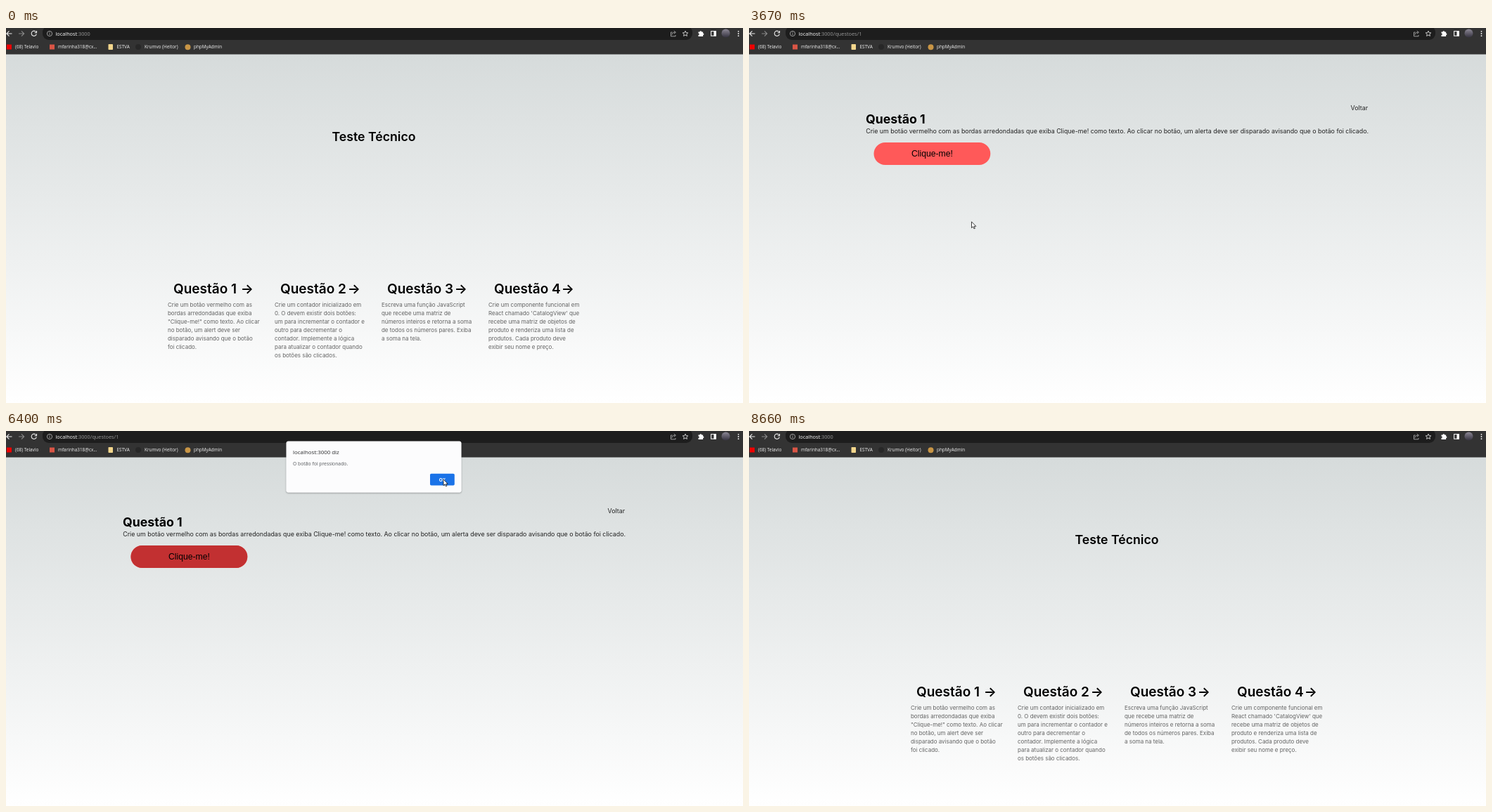
An HTML page that plays this animation: 1048 by 534 pixels, repeating every 9190 ms.

```html
<!DOCTYPE html>
<html lang="pt-BR">
<head>
<meta charset="utf-8">
<title>Teste Técnico</title>
<style>
  html, body { margin: 0; width: 100%; height: 100%; overflow: hidden; background: #fff; }
  svg { display: block; width: 100vw; height: 100vh; font-family: Inter, sans-serif; }
  .ui { font-family: "Open Sans", "Noto Sans", sans-serif; }
  .bookmarks { font-size: 6.4px; fill: #f1f1f1; }
  .url { font-size: 7.3px; fill: #fff; }
  .url .dim { fill: #9a9a9a; }
  .line { fill: none; stroke: #eee; stroke-width: 1.1; }
  .title { font-size: 17.7px; font-weight: 600; text-anchor: middle; }
  .card h2, .head { font-size: 19px; font-weight: 600; }
  .body { font-size: 7.96px; fill-opacity: .6; }
  .text { font-size: 8.85px; fill: #222; }
  .button { font: 12.2px "Liberation Sans", Arial, sans-serif; text-anchor: middle; }
</style>
</head>
<body>
<svg viewBox="0 0 1048 534" preserveAspectRatio="none">
  <defs>
    <linearGradient id="sky" x1="0" y1="0" x2="0" y2="1">
      <stop stop-color="#d6dbdb"/><stop offset="1" stop-color="#fff"/>
    </linearGradient>
    <linearGradient id="photo" x1="0" y1="0" x2="0" y2="1">
      <stop stop-color="#8b8794"/><stop offset="1" stop-color="#35323f"/>
    </linearGradient>
    <filter id="shadow" x="-10%" y="-20%" width="120%" height="150%">
      <feDropShadow dx="0" dy="1" stdDeviation="1.2" flood-opacity=".35"/>
    </filter>
  </defs>

  <rect y="37" width="1048" height="497" fill="url(#sky)"/>

  <g id="home">
    <text class="title" x="523" y="160.8">Teste Técnico</text>
    <g id="cards"></g>
  </g>

  <g id="question">
    <text class="text" x="880" y="117.2" text-anchor="end">Voltar</text>
    <text x="166" y="136.4" font-size="17.7" font-weight="700">Questão 1</text>
    <text class="text" x="166.2" y="149.8">Crie um botão vermelho com as bordas arredondadas que exiba Clique-me! como texto. Ao clicar no botão, um alerta deve ser disparado avisando que o botão foi clicado.</text>
    <g id="layers"></g>
    <text class="button" x="260.4" y="183">Clique-me!</text>
  </g>

  <g class="ui">
    <rect width="1048" height="37.5" fill="#333"/>
    <rect x="52" y="-3" width="924" height="20" rx="9" fill="#1d1d1d"/>
    <g class="line">
      <path d="M8.5 8H1M4.5 4.3L.8 8l3.7 3.7"/>
      <path d="M18 8h7.5M22 4.3L25.700 8 22 11.700" stroke="#8a8a8a"/>
      <path d="M42.600 5.500A3.600 3.600 0 1 0 43.300 8.600M43.500 4v2.700h-2.800"/>
      <circle cx="62" cy="8" r="3.600" stroke="#bbb" stroke-width=".8"/>
      <path d="M62 7.600v2.200M62 5.700v1" stroke="#bbb" stroke-width=".9"/>
      <path d="M947.500 6h-2v5.800h6.500V10M947 9.500c.3-2.500 1.700-3.300 4-3.300M949.800 4.200l2.600 2-2.600 2" stroke="#bbb" stroke-width=".8"/>
      <path d="M966 4.200l1.100 2.500 2.700.2-2 1.800.6 2.700-2.400-1.400-2.400 1.400.6-2.700-2-1.800 2.700-.2z" stroke-width=".8"/>
      <rect x="1002.600" y="4.600" width="6.800" height="6.600"/>
    </g>
    <g fill="#fff">
      <path d="M984.500 5.500h2a1.300 1.300 0 0 1 2.600 0h2v2a1.300 1.300 0 0 1 0 2.600v2h-6.600v-2a1.300 1.300 0 0 0 0-2.600z"/>
      <rect x="1006.500" y="4.500" width="3" height="7"/>
      <circle cx="1041.500" cy="4.800" r=".9"/><circle cx="1041.500" cy="8" r=".9"/><circle cx="1041.500" cy="11.200" r=".9"/>
    </g>
    <circle cx="1023.500" cy="7.500" r="6" fill="url(#photo)"/>
    <text class="url" x="70.500" y="10.600">localhost<tspan class="dim">:3000<tspan id="path">/questoes/1</tspan></tspan></text>

    <rect x="1" y="23.500" width="7" height="7" fill="#e00"/>
    <rect x="62" y="23.500" width="7" height="7" fill="#d95545"/>
    <rect x="145.500" y="23" width="6.500" height="8" rx=".8" fill="#f3d68c"/>
    <circle cx="188" cy="27" r="4" fill="#272727"/>
    <circle cx="258.500" cy="27.200" r="4" fill="#c89545"/>
    <g class="bookmarks">
      <text x="13" y="29.400">(68) Telavio</text>
      <text x="74" y="29.400">mfarinha318@cx...</text>
      <text x="157.500" y="29.400">ESTVA</text>
      <text x="197" y="29.400">Krumvo (Heitor)</text>
      <text x="267" y="29.400">phpMyAdmin</text>
    </g>
  </g>

  <g id="dialog" class="ui">
    <rect x="398.500" y="14.500" width="249" height="73" rx="3" fill="#fcfcfd" filter="url(#shadow)"/>
    <text x="408" y="33.200" font-size="7.9" fill="#2b2c2e">localhost:3000 diz</text>
    <text x="408" y="48.800" font-size="6.8" fill="#55585c">O botão foi pressionado.</text>
    <rect id="ring" x="602" y="59.800" width="36.800" height="18.800" rx="2.500" fill="#fff" stroke="#5b9bf0" stroke-width="1.300"/>
    <rect x="603" y="60.800" width="34.800" height="16.800" rx="1.800" fill="#1a73e8"/>
    <text x="620.300" y="71.500" font-size="6.3" font-weight="700" fill="#fff" text-anchor="middle">OK</text>
  </g>

  <g id="cursor" fill="#fff" stroke="#111" stroke-width=".8" stroke-linejoin="round">
    <path id="arrow" d="M0 0V8.800L2.100 7 3.500 10 4.900 9.400 3.600 6.500H6.300Z"/>
    <path id="hand" d="M-1 1Q0-.7 1 1V4.500Q2-.1+3.700 2.700 4.500 4.700Q5.600 4 5.900 5.600V8.700Q5.600 10.500 4.700 12.600H-.3Q-1.100 10.800-2.700 8.600-3.800 6.500-2.600 6.400-1.800 6.400-1 7.600Z"/>
  </g>
</svg>

<script>
const LOOP = 9190;
const OPEN_PAGE = 2650, CLOSE_PAGE = 7540;
const $ = id => document.getElementById(id);

const cards = [
  ["Crie um botão vermelho com as", "bordas arredondadas que exiba", "\"Clique-me!\" como texto. Ao clicar",
   "no botão, um alert deve ser", "disparado avisando que o botão", "foi clicado."],
  ["Crie um contador inicializado em", "0. O devem existir dois botões:", "um para incrementar o contador e",
   "outro para decrementar o", "contador. Implemente a lógica", "para atualizar o contador quando", "os botões são clicados."],
  ["Escreva uma função JavaScript", "que recebe uma matriz de", "números inteiros e retorna a soma",
   "de todos os números pares. Exiba", "a soma na tela."],
  ["Crie um componente funcional em", "React chamado 'CatalogView' que", "recebe uma matriz de objetos de",
   "produto e renderiza uma lista de", "produtos. Cada produto deve", "exibir seu nome e preço."]
];
const CARD = { x: 219, y: 350, w: 152, h: 130.8 };

$("cards").innerHTML = cards.map((lines, i) => {
  const x = CARD.x + i * CARD.w;
  const body = lines.map((s, n) => `<text class="body" x="${x + 11}" y="${397.3 + n * 11.9}">${s}</text>`).join("");
  return `<rect class="panel" x="${x + .3}" y="${CARD.y + .3}" width="${CARD.w - .6}" height="${CARD.h - .6}" rx="6.6"
    fill="rgb(180,185,188)" fill-opacity=".14" stroke="rgb(131,134,135)" stroke-opacity=".25" stroke-width=".7"/>
    <text class="head" x="${x + 19}" y="377.8">Questão ${i + 1}</text>
    <text class="head mark" x="${x + 133}" y="377.8" text-anchor="end">→</text>${body}`;
}).join("");

$("layers").innerHTML = ["#ff5959", "#c23031", "#b32828"].map(c =>
  `<rect x="177.500" y="163" width="165.800" height="32" rx="16" fill="${c}"/>`).join("");

const panels = document.querySelectorAll(".panel");
const marks = document.querySelectorAll(".mark");
const [, hoverLayer, activeLayer] = $("layers").children;

// time, x, y of the pointer's hot spot
const route = [
  [710, 610, 530], [950, 575, 440], [1200, 430, 412], [1440, 319.5, 388.8],
  [3320, 319.5, 388.8], [3670, 316.5, 276], [3940, 313, 232.800],
  [4270, 313, 232.800], [4620, 311.300, 186],
  [5410, 311.300, 186], [5700, 490, 110], [6030, 630, 64.500],
  [6270, 630, 64.500], [6400, 622, 68.800], [6640, 624, 69],
  [6900, 745, 88], [7130, 837.500, 103], [7270, 854.500, 110.500],
  [8000, 854.500, 110.500], [8200, 845, 225], [8380, 790, 400], [8480, 770, 462]
];
const START = route[0][0], END = route[route.length - 1][0];

const ramp = (t, a, b) => Math.min(1, Math.max(0, (t - a) / (b - a)));
const between = (t, a, b) => t >= a && t < b;
const show = (el, on) => el.setAttribute("visibility", on ? "visible" : "hidden");
const onQuestion = t => between(t, OPEN_PAGE, CLOSE_PAGE);

function pointer(t) {
  const i = Math.max(1, route.findIndex(p => p[0] > t));
  const [t0, x0, y0] = route[i - 1], [t1, x1, y1] = route[i];
  const k = ramp(t, t0, t1);
  return [x0 + (x1 - x0) * k, y0 + (y1 - y0) * k];
}

function hoveredCard(t) {
  if (!between(t, START, END) || onQuestion(t)) return -1;
  const [x, y] = pointer(t);
  const i = Math.floor((x - CARD.x) / CARD.w);
  return between(y, CARD.y, CARD.y + CARD.h) && i >= 0 && i < cards.length ? i : -1;
}

// A 200 ms linear transition equals the mean hover state over that window.
function hoverAmounts(t) {
  const amounts = cards.map(() => 0);
  for (let k = 0; k < 10; k++) {
    const i = hoveredCard(t - k * 20);
    if (i >= 0) amounts[i] += .1;
  }
  return amounts;
}

function drawPointer(t) {
  const visible = between(t, START, END);
  show($("cursor"), visible);
  show($("arrow"), false);
  show($("hand"), false);
  if (!visible) return;
  const [x, y] = pointer(t);
  const hand = hoveredCard(t) >= 0 || between(t, 4530, 5480) || between(t, 7250, CLOSE_PAGE + 130);
  show($(hand ? "hand" : "arrow"), true);
  $("cursor").setAttribute("transform", `translate(${x} ${y})`);
}

function drawDialog(t) {
  const enter = ramp(t, 4860, 5070), leave = ramp(t, 6480, 6650);
  const shown = enter * (1 - leave);
  show($("dialog"), shown > 0);
  show($("ring"), shown > 0 && t < 6340);
  $("dialog").setAttribute("opacity", shown);
  $("dialog").setAttribute("transform", `translate(0 ${-6 * (1 - enter) - 4.500 * leave})`);
}

function draw(t) {
  const question = onQuestion(t);
  show($("home"), !question);
  show($("question"), question);
  show($("path"), question);
  hoverAmounts(t).forEach((a, i) => {
    panels[i].setAttribute("opacity", a);
    marks[i].setAttribute("transform", `translate(${2.200 * a} 0)`);
  });
  hoverLayer.setAttribute("opacity", ramp(t, 4530, 4670) * (1 - ramp(t, 6650, 6850)));
  activeLayer.setAttribute("opacity", ramp(t, 4720, 4800) * (1 - ramp(t, 5010, 5130)));
  drawDialog(t);
  drawPointer(t);
}

const begin = performance.now();
function tick() {
  draw((performance.now() - begin) % LOOP);
  requestAnimationFrame(tick);
}
tick();
</script>
</body>
</html>
```
